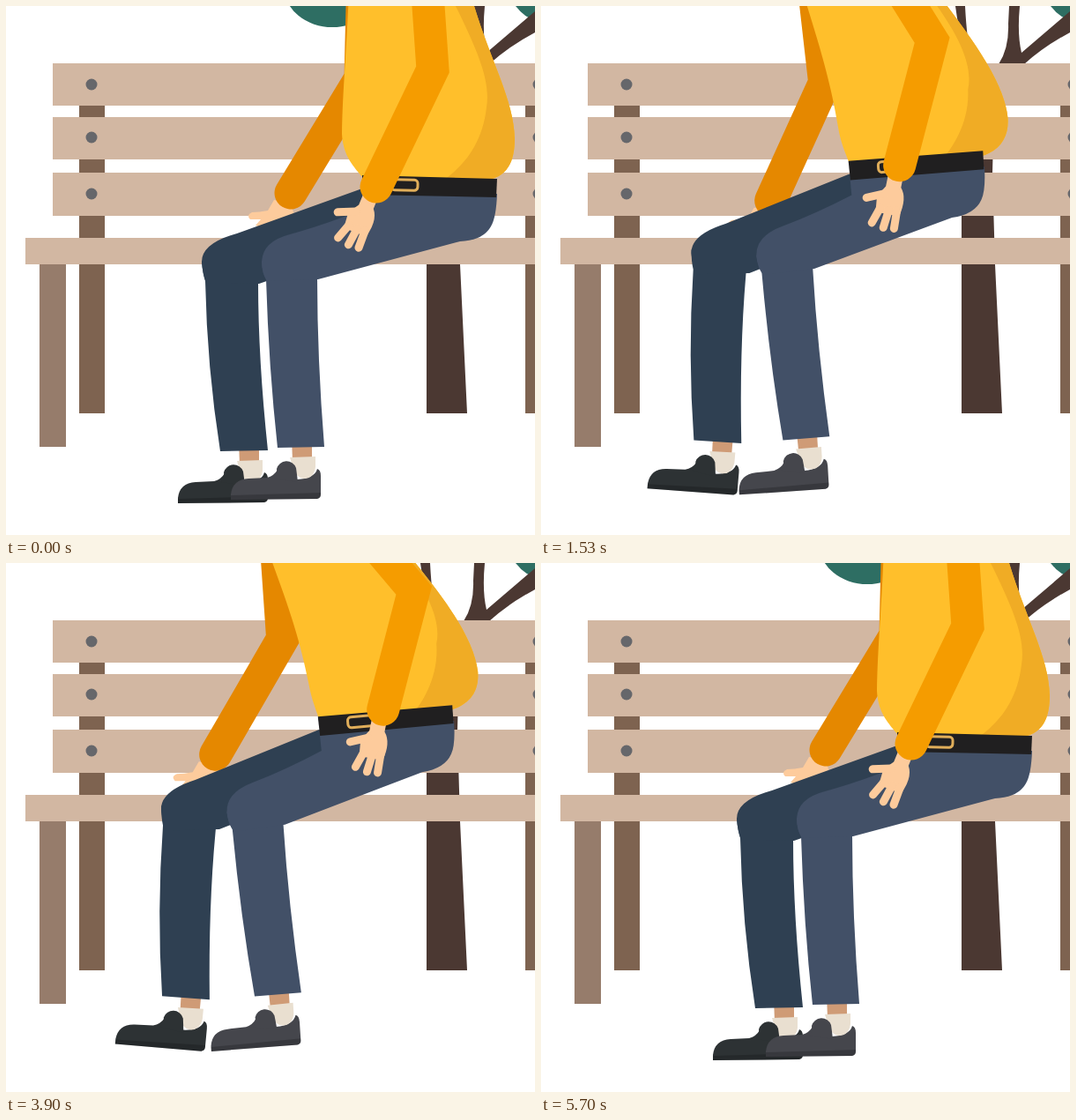
An HTML page that plays this animation: 600x600 px, repeating every 5.73 s.

```html
<!DOCTYPE html>
<html lang="en">
<head>
<meta charset="utf-8">
<title>Sliding along the bench</title>
<style>
html, body { margin: 0; width: 100%; height: 100%; overflow: hidden; background: #fff; }
svg { display: block; width: 100vw; height: 100vh; }
.arm { fill: none; stroke-width: 37; stroke-linecap: round; stroke-linejoin: miter; }
.fingers { fill: none; stroke: #fdcb9c; stroke-width: 9; stroke-linecap: round; }
</style>
</head>
<body>
<svg viewBox="0 0 600 600">
  <defs>
    <g id="foot">
      <path fill="#cf9b76" d="M324 490H347V516H325Z"/>
      <path d="M255 560V554Q257 537 275 536L296 535Q304 533 308 526L330 537Q350 536 353 525Q357 526 357 533V554Q357 558 353 559Z"/>
      <path fill="#000" opacity=".2" d="M255 560V555L357 552V555Q357 558 353 559Z"/>
      <path fill="#e9dfd0" d="M322 512L351 511V523Q349 536 338 536Q328 535 325 522Z"/>
      <path d="M304 536Q308 530 307 525A11.5 11.5 0 0 1 329 524Q330 531 331 540Z"/>
    </g>
  </defs>

  <ellipse cx="370" cy="-20" rx="54" ry="44" fill="#2e6e63"/>
  <path fill="#2e6e63" d="M578 0Q588 13 600 16V0Z"/>
  <path fill="#4b3832" d="M470 0H481Q483 40 489 65L506 105L519 66Q531 48 530 20L531 0H543Q540 32 545 53L600 6V30Q570 46 548 66L514 113L512 189L515 293L523 462H477V238L492 175L504 113Q476 50 470 0Z"/>
  <path fill="#7e6350" d="M83 100H112V462H83ZM589 100H600V462H589Z"/>
  <path fill="#967c6b" d="M38 285H68V500H38Z"/>
  <path fill="#d2b7a2" d="M53 65H600V113H53ZM53 126H600V174H53ZM53 189H600V238H53ZM22 263H600V293H22Z"/>
  <g id="bolts" fill="#66676b"></g>

  <g id="body">
    <g id="farHand">
      <path fill="#fdcb9c" d="M-19 8L-26 20Q-36 22 -44 22Q-51 25 -46 30L-34 30L-40 37L-25 42L5 30L0 10Z"/>
    </g>
    <path id="farArm" class="arm" stroke="#e58800"/>

    <g id="farLeg" fill="#2f4052">
      <g id="farShin">
        <use href="#foot" x="-60" y="4" fill="#2d3234"/>
        <path d="M222 290Q223 303 226 312Q228 410 243 505L297 504Q286 400 286 314V290Z"/>
      </g>
      <path d="M404 207L262 258Q222 269 222 290Q223 304 227 314L287 315L310 307L430 270V207Z"/>
    </g>
    <g id="nearLeg" fill="#425067">
      <g id="nearShin">
        <use href="#foot" fill="#45464c"/>
        <path d="M290 290Q291 303 295 310Q298 410 308 501L361 500Q353 400 353 309V290Z"/>
      </g>
      <path d="M404 210L557 213Q556 240 550 250Q541 266 515 267L354 310L296 312Q290 303 290 290Q291 267 322 259Q362 248 404 231Z"/>
    </g>

    <g id="trunk">
      <g id="top">
        <path id="shirt" fill="#ffbf2b"/>
        <path id="shade" fill="#f0ac25"/>
      </g>
      <path fill="#201f20" d="M404 192L557 196L556 217L404 214Z"/>
      <rect x="437" y="197" width="30" height="12" rx="4" fill="none" stroke="#e0ae5a" stroke-width="3" transform="rotate(1.5 452 203)"/>
    </g>

    <g id="nearHand">
      <path fill="#fdcb9c" d="M-10 8H7L8 24Q18 34 14 56L-13 58L-16 40L-9 27Z"/>
      <path class="fingers" d="M-8 35L-27 45M-9 52L-14 71M1 52L0 73M10 50L12 71"/>
    </g>
    <path id="nearArm" class="arm" stroke="#f59c00"/>
  </g>
</svg>
<script>
const LOOP = 5730, HIP = [404, 192];
const $ = id => document.getElementById(id);
const place = (id, transform) => $(id).setAttribute('transform', transform);

for (const x of [97, 604])
  for (const y of [89, 149, 213])
    $('bolts').innerHTML += `<circle cx="${x}" cy="${y}" r="6.5"/>`;

// Upright and leaning outlines share one structure so they can be blended.
const shirt = [
  'M390 -40C386 60 382 90 381 145C382 170 395 183 405 195L540 198C570 196 577 175 577 150C576 105 548 60 528 -10L520 -40Z',
  'M345 -40C375 50 390 95 398 155C400 172 403 183 405 195L540 198C575 195 590 180 590 155C588 110 545 50 498 -10L480 -40Z'
];
const shade = [
  'M495 198C515 185 540 160 545 115C550 85 535 50 505 -10L528 -10C548 60 576 105 577 150C577 175 570 196 540 198Z',
  'M512 198C525 185 545 155 544 120C555 85 525 35 490 -10L498 -10C545 50 588 110 590 155C590 180 575 195 540 198Z'
];
function blend([a, b], k) {
  const ends = b.match(/-?\d+/g);
  let i = 0;
  return a.replace(/-?\d+/g, n => +n + (ends[i++] - n) * k);
}

// Upper body keys: lean, then near and far arm as shoulder, elbow, cuff relative to the hip.
const times = [0, 600, 1530, 3030, 3900, 4500, 5700];
const upright = [0, 75, -192, 80, -120, 16, 13, 0, -192, -2, -110, -81, 20];
const poses = [
  upright,
  [1, 53, -192, 76, -112, 43, 28, -36, -192, -60, -88, -134, 45],
  [.8, 70, -177, 95, -137, 58, 5, -37, -177, -27, -89, -88, 45],
  [0, 92, -191, 96, -120, 36, 12, 10, -191, 6, -111, -64, 16],
  [.9, 82, -175, 109, -143, 74, -8, -46, -175, -40, -88, -116, 43],
  [.75, 54, -187, 80, -114, 49, 25, -42, -187, -60, -87, -132, 46],
  upright
];
const slope = (i, j) => (poses[i + 1][j] - poses[i][j]) / (times[i + 1] - times[i]);
function tangent(i, j) {
  if (i === 0 || i === times.length - 1) return 0;
  const a = slope(i - 1, j), b = slope(i, j);
  return a * b > 0 ? 2 * a * b / (a + b) : 0;
}
// Monotone cubic through the keys
function poseAt(t) {
  t = Math.min(t, times.at(-1));
  let i = 0;
  while (i < times.length - 2 && t >= times[i + 1]) i++;
  const d = times[i + 1] - times[i], u = (t - times[i]) / d, v = 1 - u;
  return poses[i].map((p, j) =>
    p * v * v * (1 + 2 * u) + poses[i + 1][j] * u * u * (3 - 2 * u) +
    d * u * v * (tangent(i, j) * v - tangent(i + 1, j) * u));
}

function smooth(t, from, to) {
  const u = Math.min(1, Math.max(0, (t - from) / (to - from)));
  return u * u * (3 - 2 * u);
}

function drawArm(id, p) {
  const [sx, sy, ex, ey, cx, cy] = p.map((n, i) => n + HIP[i % 2]);
  const topX = sx + (sx - ex) * .8, topY = sy + (sy - ey) * .8;
  $(id).setAttribute('d', `M${topX} ${topY}L${ex} ${ey}L${cx} ${cy}`);
  return { x: cx, y: cy, angle: Math.atan2(ex - cx, cy - ey) * 180 / Math.PI };
}

function draw(t) {
  const left = smooth(t, 600, 2080) - smooth(t, 3270, 4790);
  const lift = Math.sin(Math.PI * left);
  const tilt = -6.5 * lift;
  place('body', `translate(${-80.3 * left} ${-18 * lift - 2 * left})`);
  place('trunk', `rotate(${tilt - .6 * left} ${HIP})`);
  place('top', `rotate(${3.5 * left} ${HIP})`);
  place('nearLeg', `rotate(${tilt} ${HIP})`);
  place('farLeg', `rotate(${tilt * .4} ${HIP})`);
  place('nearShin', `rotate(${-4 * lift - tilt} 323 290)`);
  place('farShin', `rotate(${5.5 * lift + .4 * left - tilt * .4} 255 290)`);

  const [lean, ...arms] = poseAt(t);
  $('shirt').setAttribute('d', blend(shirt, lean));
  $('shade').setAttribute('d', blend(shade, lean));
  const near = drawArm('nearArm', arms.slice(0, 6));
  const far = drawArm('farArm', arms.slice(6));
  place('nearHand', `translate(${near.x} ${near.y}) rotate(${near.angle})`);
  place('farHand', `translate(${far.x} ${far.y})`);
}

const start = performance.now();
function tick() {
  draw((performance.now() - start) % LOOP);
  requestAnimationFrame(tick);
}
tick();
</script>
</body>
</html>
```
